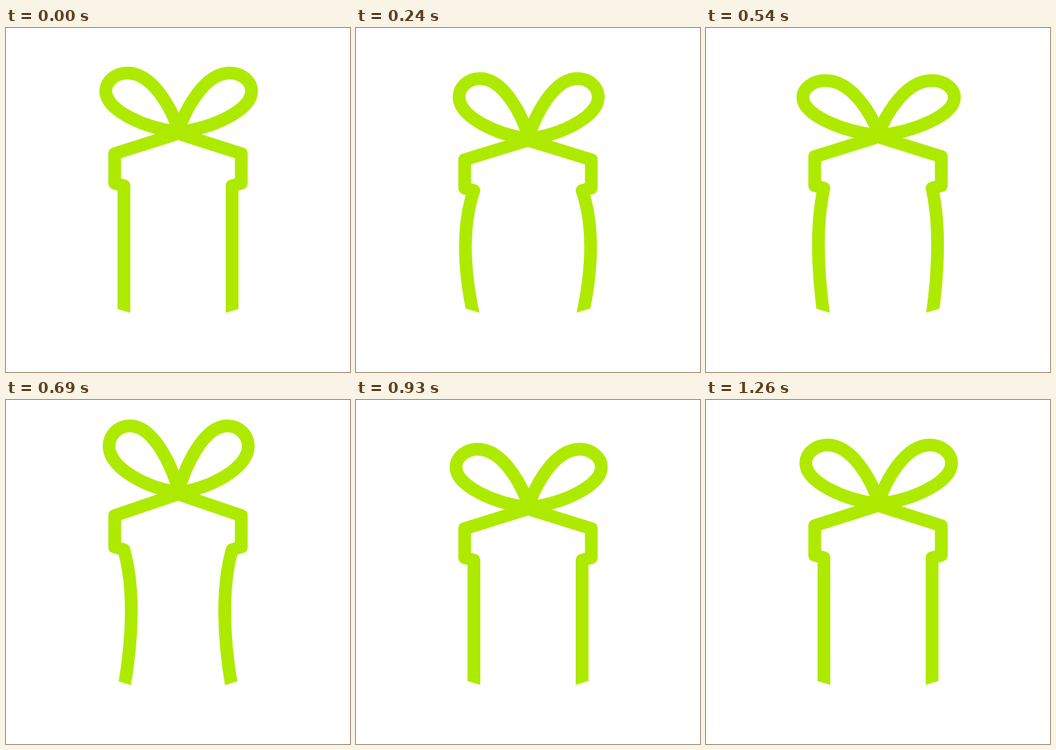
Animation of 512 by 512 pixels, one loop 1.32 s. Source, as an HTML page:

```html
<!DOCTYPE html>
<html lang="en">
<head>
<meta charset="utf-8">
<title>Bouncing gift</title>
<style>
  html, body { margin: 0; width: 100%; height: 100%; overflow: hidden; background: #fff; }
  svg { display: block; width: 100vw; height: 100vh; }
</style>
</head>
<body>
<svg viewBox="0 0 512 512">
  <clipPath id="floor"><path d="M0 0H512V368.5L256 445.3L0 368.5Z"/></clipPath>
  <g clip-path="url(#floor)">
    <path id="gift" fill="none" stroke="#aeea00" stroke-width="19" stroke-linejoin="round"/>
  </g>
</svg>
<script>
const LOOP = 1320, STEP = 30, LAST = 1260;
const FLOOR = 423, APEX = 157, END = 430;
const BOX_MID = 256, BOW_MID = 257;

// [time, value] keys
const DROP = [[0, 0], [120, 5], [360, 13], [540, 5], [690, -17], [930, 5], [1140, -1.5], [1260, 0]];
const BULGE = [[0, 0], [120, 9.5], [360, 14], [540, 8], [690, -11], [930, 0], [1260, 0]];
const BOW = [[0, 1], [120, 1.04], [240, 1.06], [360, 1.043], [540, 0.948], [690, 1.06], [930, 1.004], [1260, 1]];

const gift = document.getElementById('gift');

const slope = (a, b) => (b[1] - a[1]) / (b[0] - a[0]);

// Tangent that never overshoots a key
function tangent(keys, i) {
  if (i === 0 || i === keys.length - 1) return 0;
  const a = slope(keys[i - 1], keys[i]);
  const b = slope(keys[i], keys[i + 1]);
  return a * b <= 0 ? 0 : 2 * a * b / (a + b);
}

function sample(keys, t) {
  let i = 0;
  while (i < keys.length - 2 && t >= keys[i + 1][0]) i++;
  const [t0, v0] = keys[i], [t1, v1] = keys[i + 1];
  const span = t1 - t0, u = (t - t0) / span;
  const ease = u * u * (3 - 2 * u);
  return v0 + (v1 - v0) * ease
    + span * u * (1 - u) * ((1 - u) * tangent(keys, i) - u * tangent(keys, i + 1));
}

const fmt = ([x, y]) => x.toFixed(2) + ' ' + y.toFixed(2);
const curve = pts => 'C' + pts.map(fmt).join(' ');
const flip = (pts, mid) => pts.map(([x, y]) => [2 * mid - x, y]);

function side(pts) {
  return 'M' + fmt(pts[0]) + curve(pts.slice(1, 4)) + pts.slice(4).map(p => 'L' + fmt(p)).join('');
}

function loop(pts) {
  return 'M' + fmt(pts[0]) + curve(pts.slice(1));
}

function draw(t) {
  const drop = sample(DROP, t), bulge = sample(BULGE, t), bow = sample(BOW, t);
  const squash = 1 - drop / (FLOOR - APEX);
  const y = v => FLOOR - (FLOOR - v) * squash;

  const wall = 175.5, top = y(234.8), len = END - top;
  const belly = wall - bulge * 4 / 3;
  const half = [
    [wall, END], [belly, top + len * 0.6], [belly, top + len * 0.25], [wall, top],
    [161.8, y(231)], [161.8, y(187)], [BOX_MID, y(APEX)]
  ];
  const right = flip(half, BOX_MID);
  const box = side(half) + right.slice(3, 6).reverse().map(p => 'L' + fmt(p)).join('')
    + curve([right[2], right[1], right[0]]);

  const wide = 1 - 0.75 * (bow - 1), tall = squash * bow;
  const ribbon = [
    [258, 155], [247, 120], [218, 67], [181, 67],
    [163, 67], [148.5, 79], [148.5, 94],
    [148.5, 122], [205, 149], [258, 155]
  ].map(([px, py]) => [BOW_MID + (px - BOW_MID) * wide, y(APEX) + (py - APEX) * tall]);

  gift.setAttribute('d', box + loop(ribbon) + loop(flip(ribbon, BOW_MID)));
}

let start = null;
function tick(now) {
  if (start === null) start = now;
  const t = (now - start) % LOOP;
  draw(Math.min(Math.floor(t / STEP) * STEP, LAST));
  requestAnimationFrame(tick);
}
draw(0);
requestAnimationFrame(tick);
</script>
</body>
</html>
```
